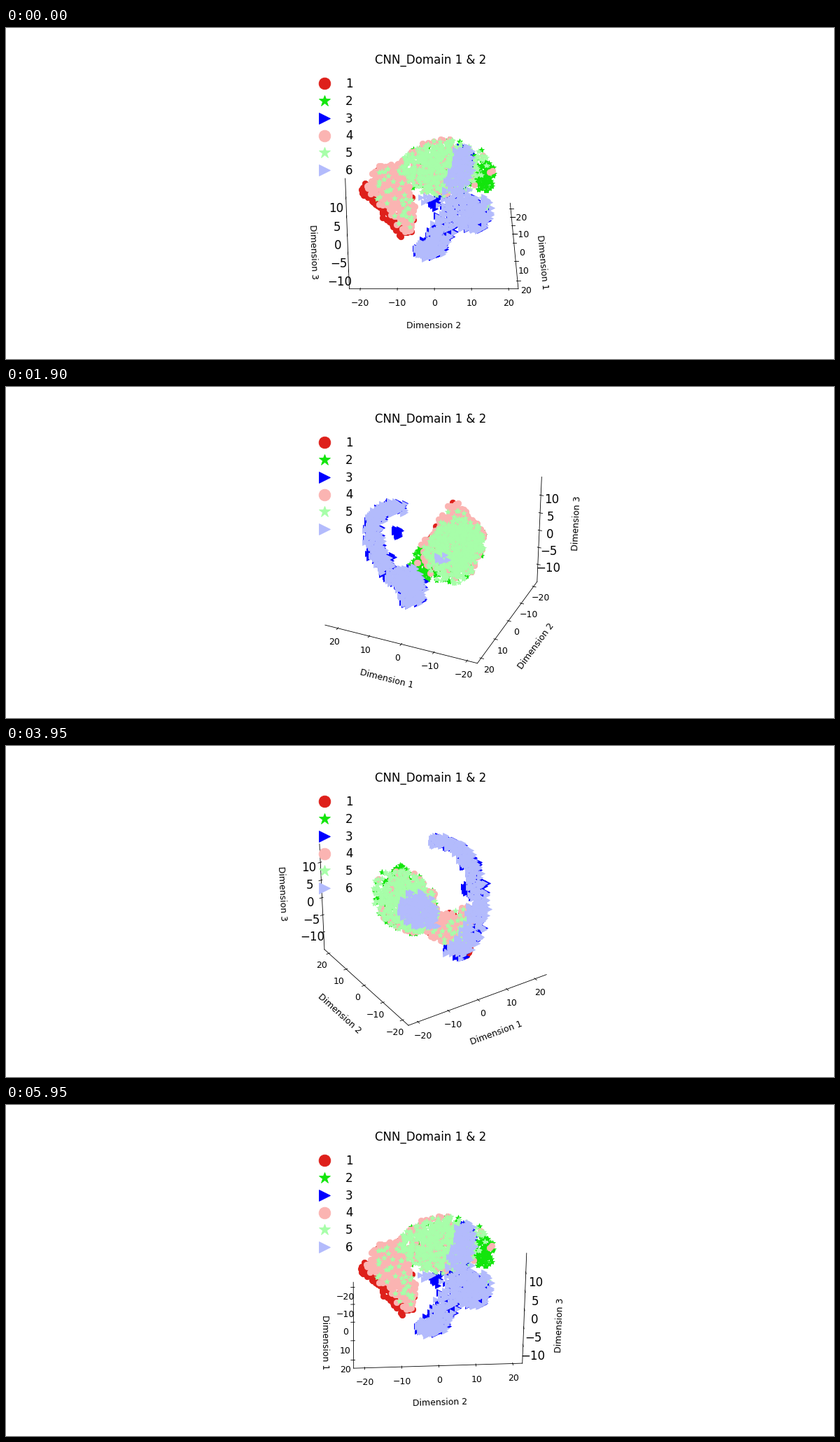
A matplotlib script that plays this animation: 1183x473 px, repeating every 6000 ms.

```python
import numpy as np
import matplotlib.pyplot as plt
from matplotlib.animation import FuncAnimation

W, H, DPI = 1183, 473, 100
FRAMES, INTERVAL = 120, 50
rng = np.random.default_rng(7)
plt.rcParams.update({"axes.linewidth": 0.6, "xtick.major.width": 0.6,
                     "ytick.major.width": 0.6})


def blob(n, center, radii):
    """Points spread evenly inside an ellipsoid."""
    v = rng.normal(size=(n, 3))
    v /= np.linalg.norm(v, axis=1, keepdims=True)
    return np.array(center) + v * rng.random((n, 1)) ** (1 / 3) * radii


def crescent(n, grow=1.0):
    """A tube bent along a half ellipse, thinner at its upper tip."""
    a = np.radians(rng.uniform(-90, 90, n))
    c, s = np.cos(a), np.sin(a)
    path = np.column_stack([5.9 + 12.1 * c, 3 + 5 * s, 0.7 + 13.6 * s])
    size = grow * (1 - 0.35 * np.clip(s, 0, 1) ** 4)
    return path + blob(n, 0, (2.6, 3.9, 2.1)) * size[:, None]


def patch(n, grow=1.0):
    p = blob(n, 0, (4.6, 5.5, 5)) * grow
    p[:, 0] -= 0.35 * p[:, 1]
    return p + (2.5, 10.9, -5.3)


def dome(n, grow=1.0):
    return blob(n, (-7.2, 3, 3.1), np.array([7.6, 12.6, 7.4]) * grow)


def wedge(n):
    """Points on random triangles between the corners of the red group."""
    out = []
    for _ in range(n):
        three = rng.choice(len(CORNERS), 3, replace=False)
        out.append(rng.dirichlet([0.8] * 3) @ CORNERS[three])
    return np.array(out) + blob(n, 0, 1.6)


def rim(n):
    """Points along the lower edge of the wedge, densest at its ends."""
    t = rng.beta(0.6, 0.8, (n, 1))
    return CORNERS[0] * (1 - t) + CORNERS[1] * t + blob(n, (0, -0.6, -0.5), 2)


def thin(points, limit, keep):
    """Keep only a share of the points beyond a limit along Dimension 2."""
    return points[(points[:, 1] < limit) | (rng.random(len(points)) < keep)]


CORNERS = np.array([(-3.5, -18.4, -0.9), (6.1, -7.2, -8.6), (0.9, -15.3, 6),
                    (-11, -9.2, 3), (6, -6.5, -2.5)])
TIP = np.array([-1.9, 13.4, 2.8])

groups = [
    ("o", "#de201b", [rim(110), wedge(70)]),
    ("*", "#12e50c", [blob(85, TIP, (3.5, 3.4, 5)), dome(110, 1.03)]),
    (">", "#0000ff", [crescent(280, 1.04), patch(80, 1.04),
                      blob(25, (12.2, -0.2, 2.9), 1.3)]),
    ("o", "#fbb4b2", [wedge(400), thin(dome(280), 5, 0.15),
                      blob(2, TIP + (0, 2.6, 1.5), 0.8)]),
    ("*", "#a7fea9", [thin(dome(600), 10, 0.3), wedge(45), patch(6, 1.1)]),
    (">", "#b3bbfc", [crescent(450), patch(210), blob(8, (-1, -2, -2.4), 2)]),
]

fig = plt.figure(figsize=(W / DPI, H / DPI + 1e-9), dpi=DPI, facecolor="white")
ax = fig.add_subplot(projection="3d")
for k, (marker, color, parts) in enumerate(groups, 1):
    ax.plot(*np.vstack(parts).T, marker, color=color, ms=6, mew=0.6,
            label=str(k))

ax.set(xlim=(-23.1, 24.1), ylim=(-22.95, 22.6), zlim=(-15.2, 15.1))
for k, (axis, step, size) in enumerate(
        [(ax.xaxis, 10, 9), (ax.yaxis, 10, 9), (ax.zaxis, 5, 12)], 1):
    axis.set_ticks(np.arange(-2, 3) * step)
    axis.set_tick_params(labelsize=size, pad=-1)
    axis.set_label_text(f"Dimension {k}", fontsize=9)
    axis.pane.set_visible(False)
ax.grid(False)
ax.set_title("CNN_Domain 1 & 2", fontsize=12, pad=4)
ax.legend(loc="upper left", fontsize=12, frameon=False, markerscale=2,
          labelspacing=0.41, borderaxespad=0.45)


def turn(i):
    # a hair past the right angle keeps the choice of visible axes stable
    ax.view_init(elev=30, azim=360 * i / FRAMES + 1e-3)
    return []


anim = FuncAnimation(fig, turn, frames=FRAMES, interval=INTERVAL,
                     init_func=lambda: turn(0), repeat=True, repeat_delay=0)
plt.show()
```
